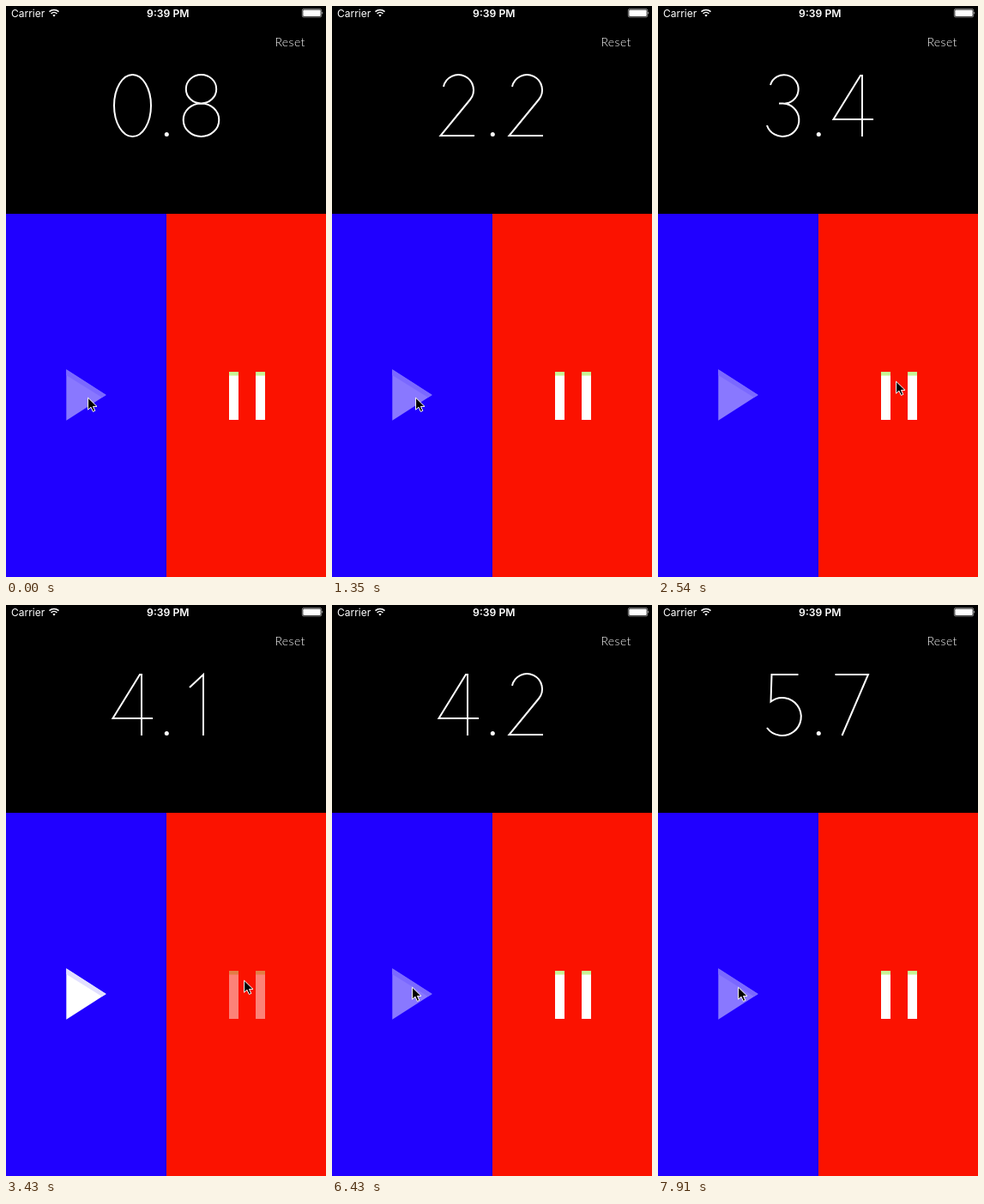
Write an HTML page that moves like this. It is 373 by 665 pixels and loops after 8 s.

```html
<!DOCTYPE html>
<html lang="en">
<head>
<meta charset="utf-8">
<title>Stopwatch</title>
<style>
  html, body { margin: 0; width: 100%; height: 100%; overflow: hidden; background: #000; }
  svg { display: block; width: 100%; height: 100%; }
  text { fill: #fff; font: 12px Inter, sans-serif; }
  .line { fill: none; stroke: #fff; stroke-width: 2; }
  .thin { stroke-width: 1.5; }
  .faded { opacity: .47; }
  .pressed { filter: brightness(.5); }
</style>
</head>
<body>
<svg viewBox="0 0 373 665">
  <rect width="373" height="665" fill="#000"/>

  <text x="6" y="12.6">Carrier</text>
  <path class="line thin" d="M50.5 6.6A8 8 0 0 1 61.5 6.6M52.6 8.9A5 5 0 0 1 59.4 8.9"/>
  <path fill="#fff" d="M54.3 10.7Q56 9.4 57.7 10.7L56 12.4Z"/>
  <text x="188.8" y="12.6" text-anchor="middle" style="font-weight:600;font-size:12.2px">9:39 PM</text>
  <rect x="345.3" y="3.4" width="22.4" height="9.6" rx="1.8" fill="none" stroke="#fff" stroke-width=".5"/>
  <rect x="346.3" y="4.4" width="20.4" height="7.6" rx="1" fill="#fff"/>
  <path d="M368.4 6.6Q370 8.2 368.4 9.8Z" fill="#fff"/>
  <text x="313.4" y="47" style="font:300 14px Lato, sans-serif;letter-spacing:.4px">Reset</text>

  <g id="readout" role="img">
    <path id="units" class="line"/>
    <circle cx="187.3" cy="149.6" r="2.5" fill="#fff"/>
    <path id="tenths" class="line" transform="translate(80)"/>
  </g>

  <rect y="242" width="187" height="423" fill="#2000ff"/>
  <rect x="187" y="242" width="186" height="423" fill="#fb1200"/>
  <g id="play">
    <path d="M70.3 423.2L116.7 453L70.3 482.8Z" fill="#fff"/>
    <path d="M70.3 423.2L116.7 453L112 456L70.3 430Z" fill="#e2e0ff"/>
  </g>
  <g id="pause">
    <path d="M260 426h11v56h-11zM291 426h11v56h-11z" fill="#fff"/>
    <path d="M260 426h11v4.5h-11zM291 426h11v4.5h-11z" fill="#c8f596"/>
  </g>
  <path id="cursor" d="M.6 1.2V15.2L4 12.2L6.4 17.4L8.8 16.4L6.5 11.4H11Z" fill="#000" stroke="#fff"/>
</svg>
<script>
const LOOP = 8000, TICK = 149;
const PAUSE_DOWN = 3130, STOP = 3280, PAUSED = 3430, PLAY_DOWN = 6130, RESUMED = 6430;

const oval = (x, y, rx, ry = rx) =>
  `M${x} ${y - ry}a${rx} ${ry} 0 0 1 0 ${2 * ry}a${rx} ${ry} 0 0 1 0 ${-2 * ry}`;

// Single-stroke numerals, drawn in the units position.
const DIGITS = [
  oval(147.5, 116, 21.5, 36),
  'M134 96L150 81V152',
  'M130 94A17.7 17.7 0 1 1 161 109L126.5 151H166',
  'M131 92A16.7 16.7 0 1 1 146 113.6H141H146A19.2 19.2 0 1 1 127 139',
  'M158 152V81H156L124.5 132H171',
  'M163.5 81H132.5L131.5 112.5A22 22 0 1 1 127 143',
  'M151.5 80L129 121' + oval(147.5, 131, 21),
  'M126.5 81H165L134.5 152',
  oval(147.5, 96.7, 17.7, 16.7) + oval(147.5, 132.7, 20.8, 19.3),
  'M143.5 152L166 111' + oval(147.5, 101, 21)
];

const el = id => document.getElementById(id);
const [readout, units, tenths, play, pause, cursor] =
  ['readout', 'units', 'tenths', 'play', 'pause', 'cursor'].map(el);

// Smooth progress from 0 to 1 between two times.
function ease(t, start, end) {
  const k = Math.min(1, Math.max(0, (t - start) / (end - start)));
  return k * k * (3 - 2 * k);
}

// The pointer nudges, crosses to pause, then returns to play.
function pointerAt(t) {
  const nudge = ease(t, 1200, 1350), over = ease(t, 1500, 2560), back = ease(t, 4330, 5090);
  const x = 95 + 2 * nudge + 180 * over - 184 * back;
  const y = 455 - 19 * over + 8 * back;
  return [Math.round(x), Math.round(y)];
}

function draw(now) {
  const t = now % LOOP;
  const shown = Math.floor(t / TICK) * TICK;
  const resumed = t >= RESUMED;
  const elapsed = resumed ? shown - 2180 : Math.min(shown, STOP) + 880;

  const count = Math.floor(elapsed / 100);
  units.setAttribute('d', DIGITS[Math.floor(count / 10)]);
  tenths.setAttribute('d', DIGITS[count % 10]);
  readout.setAttribute('aria-label', (count / 10).toFixed(1));

  const running = t < PAUSED || resumed;
  play.setAttribute('class', running ? 'faded' : t >= PLAY_DOWN ? 'pressed' : '');
  pause.setAttribute('class', !running ? 'faded' : t >= PAUSE_DOWN && !resumed ? 'pressed' : '');
  cursor.setAttribute('transform', `translate(${pointerAt(shown)})`);
  requestAnimationFrame(draw);
}
draw(0);
</script>
</body>
</html>
```
